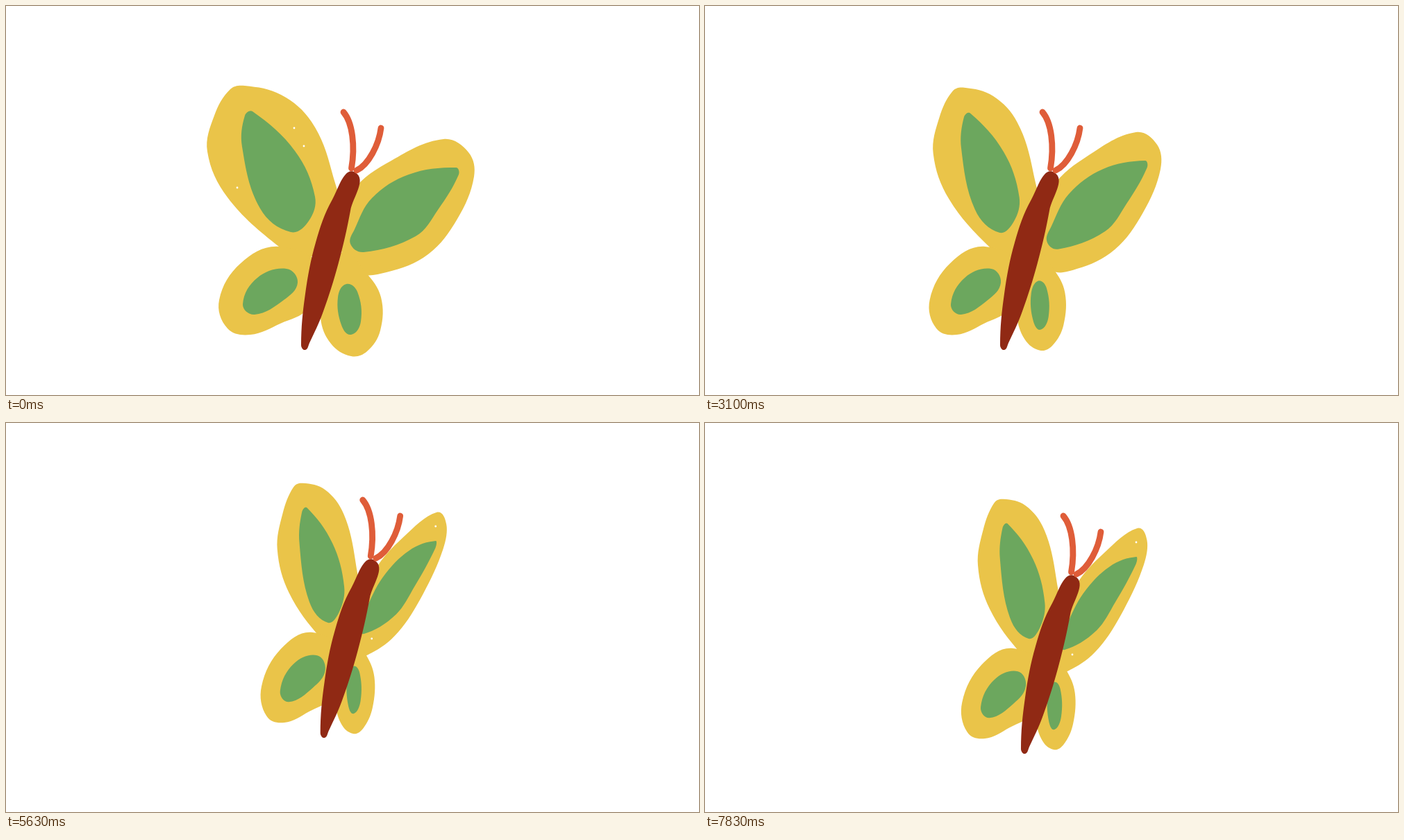
An HTML page with a canvas that plays this animation: 998x561 px, repeating every 7.91 s.

```html
<!DOCTYPE html>
<html lang="en">
<head>
<meta charset="utf-8">
<title>Butterfly</title>
<style>
html, body { margin: 0; width: 100%; height: 100%; overflow: hidden; background: #fff; }
canvas { display: block; }
</style>
</head>
<body>
<canvas id="stage" width="998" height="561"></canvas>
<script>
const ctx = document.getElementById('stage').getContext('2d');
const LOOP = 7910, STEPS = 72;
const YELLOW = '#eac449', GREEN = '#6ca75e', RED = '#902914', ORANGE = '#df5d39';

// Key points of the open wings. Folding carries the three pins "from" to "to";
// "half" is the share of that move, in x and y, reached by the middle pose.
const wings = [
  { // upper left
    outer: [344,115, 396,128, 440,167, 469,238, 480,320, 430,365, 393,347, 319,276, 290,210, 300,158, 323,120],
    patch: [344,158, 355,152, 416,209, 445,275, 436,310, 410,326, 366,292, 340,203],
    from: [340,115, 290,210, 410,326], to: [397,129, 363,224, 436,330], half: [.53, .2]
  },
  { // lower left
    outer: [393,347, 338,371, 307,424, 319,465, 352,474, 395,458, 435,436, 455,380],
    patch: [420,399, 404,379, 362,392, 341,430, 358,445, 400,424],
    from: [307,428, 348,474, 420,400], to: [340,426, 370,474, 432,399], half: [.5, 0]
  },
  { // upper right
    outer: [500,266, 555,223, 630,192, 666,211, 674,246, 650,307, 608,358, 548,384, 505,383, 478,330],
    patch: [648,233, 652,243, 622,294, 590,332, 515,355, 496,343, 502,322, 527,277, 580,243],
    from: [630,192, 652,238, 515,355], to: [592,171, 592,217, 488,346], half: [.25, .48]
  },
  { // lower right
    outer: [518,384, 540,420, 539,468, 520,498, 497,505, 468,487, 453,450, 458,390, 485,355],
    patch: [490,401, 478,420, 483,460, 497,474, 511,455, 506,412],
    from: [497,505, 490,401, 512,445], to: [472,490, 472,393, 484,433], half: [.58, .55]
  }
];
const body = [503,240, 470,279, 446,341, 431,415, 425,489, 431,496, 437,486, 456,443, 479,370, 496,295];

// White flecks left by the brush, per pose
const flecks = [[[415,176], [429,202], [333,262]], [], [[591,191], [499,353]]];

const flap = [0, 1, 2, 1];
const drift = [[0,0], [-2,-22], [-5,-44], [-6,-59], [6,-53], [27.7,-42], [39.3,-31], [30,-19], [13,-6]];

// Smooth closed curve: each tangent runs parallel to the line between the neighbours
function blob(flat, color) {
  const n = flat.length / 2;
  const at = i => { const k = (i + n) % n * 2; return [flat[k], flat[k + 1]]; };
  const handle = (i, len) => {
    const [px, py] = at(i - 1), [x, y] = at(i), [nx, ny] = at(i + 1);
    const s = len / Math.hypot(nx - px, ny - py);
    return [x + (nx - px) * s, y + (ny - py) * s];
  };
  ctx.beginPath();
  ctx.moveTo(...at(0));
  for (let i = 0; i < n; i++) {
    const [x, y] = at(i), [nx, ny] = at(i + 1);
    const len = Math.hypot(nx - x, ny - y) * .36;
    ctx.bezierCurveTo(...handle(i, len), ...handle(i + 1, -len), nx, ny);
  }
  ctx.fillStyle = color;
  ctx.fill();
}

// Affine map that carries three pins p onto three pins q
function pinMap(p, q) {
  const [ux, uy, vx, vy] = [p[2] - p[0], p[3] - p[1], p[4] - p[0], p[5] - p[1]];
  const det = ux * vy - vx * uy;
  const row = i => {
    const du = q[2 + i] - q[i], dv = q[4 + i] - q[i];
    const mx = (du * vy - dv * uy) / det, my = (dv * ux - du * vx) / det;
    return [mx, my, q[i] - mx * p[0] - my * p[1]];
  };
  const x = row(0), y = row(1);
  return [x[0], y[0], x[1], y[1], x[2], y[2]];
}

function paintWings(pose, part, color) {
  for (const wing of wings) {
    const share = [[0, 0], wing.half, [1, 1]][pose];
    const pins = wing.from.map((v, i) => v + (wing.to[i] - v) * share[i % 2]);
    ctx.save();
    ctx.transform(...pinMap(wing.from, pins));
    blob(wing[part], color);
    ctx.restore();
  }
}

function antenna(x, y, ...curve) {
  ctx.beginPath();
  ctx.moveTo(x, y);
  ctx.bezierCurveTo(...curve);
  ctx.stroke();
}

function draw(step) {
  const s = step % (STEPS / 2);
  const beat = s < 5 ? s : s - 1; // one beat is held
  const pose = flap[beat % flap.length];
  ctx.fillStyle = '#fff';
  ctx.fillRect(0, 0, 998, 561);
  ctx.save();
  ctx.translate(...drift[beat % drift.length]);
  paintWings(pose, 'outer', YELLOW);
  paintWings(pose, 'patch', GREEN);
  ctx.fillStyle = '#fff';
  for (const [x, y] of flecks[pose]) {
    ctx.beginPath();
    ctx.arc(x, y, 1.4, 0, 7);
    ctx.fill();
  }
  blob(body, RED);
  ctx.strokeStyle = ORANGE;
  ctx.lineCap = 'round';
  ctx.lineWidth = 8.8;
  antenna(486, 153, 499, 168, 503, 202, 497.5, 234);
  antenna(540, 176, 537, 200, 522, 229, 505, 237);
  ctx.restore();
}

// Steps of 3.3 ticks at 30 ticks a second, rounded to 10 ms
const startOf = k => Math.round(Math.ceil(33 * k / 10) * 10 / 3) * 10;

let shown = -1;
function tick() {
  const t = performance.now() % LOOP;
  let k = 0;
  while (k < STEPS - 1 && startOf(k + 1) <= t) k++;
  if (k !== shown) draw(shown = k);
  requestAnimationFrame(tick);
}
tick();
</script>
</body>
</html>
```
